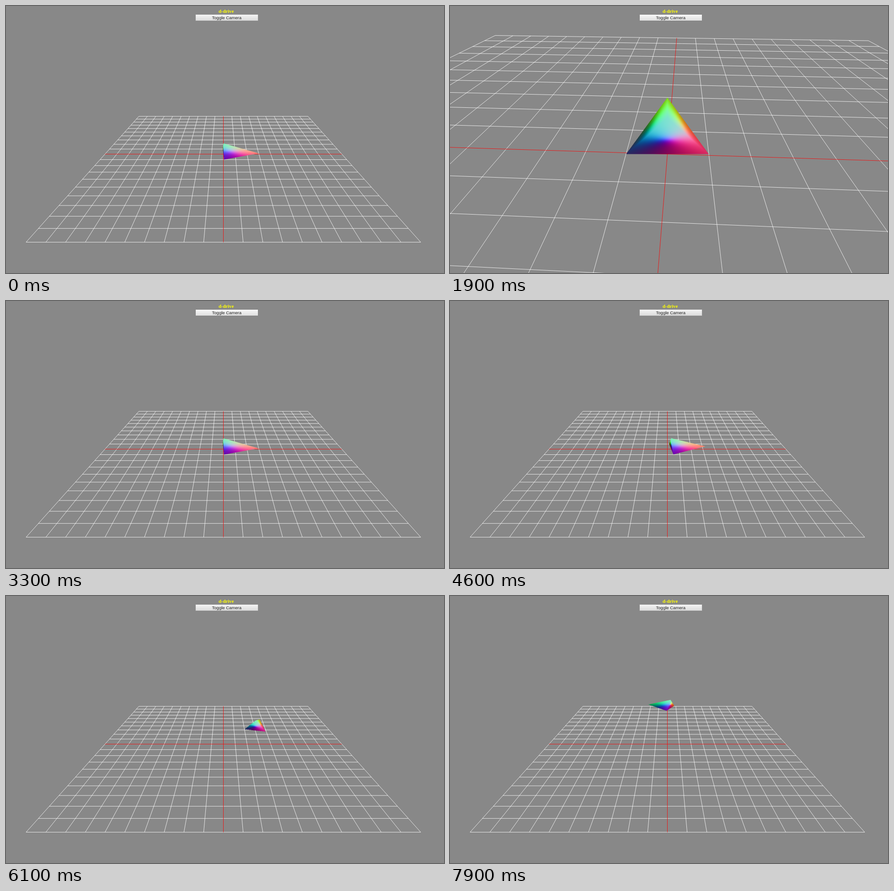
These frames come from a looping animation (958x585 px, 8 s). An HTML page with a canvas:

```html
<!DOCTYPE html>
<html lang="en">
<head>
<meta charset="utf-8">
<title>d-drive</title>
<style>
  html, body { margin: 0; width: 100%; height: 100%; overflow: hidden; background: #888; }
  canvas, svg { position: absolute; left: 0; top: 0; display: block; }
  text { text-anchor: middle; }
  .title { font: bold 10.7px "Liberation Serif", "Times New Roman", serif; fill: #ff0; }
  .label { font: 9.5px "Liberation Sans", Arial, sans-serif; fill: #222; }
</style>
</head>
<body>
<canvas id="view" width="958" height="585"></canvas>
<svg width="958" height="585" viewBox="0 0 958 585">
  <defs>
    <linearGradient id="face" x1="0" y1="0" x2="0" y2="1">
      <stop id="hi" offset="0.1"/>
      <stop id="lo" offset="1"/>
    </linearGradient>
  </defs>
  <text class="title" x="481.5" y="15">d-drive</text>
  <rect id="button" x="414.5" y="18.5" width="137" height="14" fill="url(#face)"/>
  <text class="label" x="482.8" y="28.6">Toggle Camera</text>
</svg>
<script>
const W = 958, H = 585, LOOP = 8000, STEP = 100;
const CX = 475.5, CY = 324.5, FOCAL = 579, NEAR = 0.1;
const GREY = '#888', WHITE = '#fff', RED = '#f00';

const ctx = document.getElementById('view').getContext('2d');

// the vehicle is shaded at double size, then smoothed down
const SS = 2, SW = W * SS, SH = H * SS;
const layer = document.createElement('canvas');
layer.width = SW;
layer.height = SH;
const layerCtx = layer.getContext('2d');
const image = layerCtx.createImageData(SW, SH);
const pixels = new Uint32Array(image.data.buffer);

// vectors
const add = (a, b) => a.map((v, i) => v + b[i]);
const sub = (a, b) => a.map((v, i) => v - b[i]);
const mul = (a, s) => a.map(v => v * s);
const dot = (a, b) => a[0] * b[0] + a[1] * b[1] + a[2] * b[2];
const cross = (a, b) => [
  a[1] * b[2] - a[2] * b[1],
  a[2] * b[0] - a[0] * b[2],
  a[0] * b[1] - a[1] * b[0]
];
const unit = a => mul(a, 1 / Math.hypot(...a));

// vehicle: x forward, y up, z right
const VERTS = [[3, 0, 0], [0, 1, 0], [0, 0, -1], [0, 0, 1]];
const FACES = [[0, 1, 3], [0, 2, 1], [1, 2, 3], [0, 3, 2]];
const NORMALS = smoothNormals();

// area-weighted vertex normals
function smoothNormals() {
  const sums = VERTS.map(() => [0, 0, 0]);
  for (const face of FACES) {
    const [a, b, c] = face.map(i => VERTS[i]);
    const n = cross(sub(b, a), sub(c, a));
    for (const i of face) sums[i] = add(sums[i], n);
  }
  return sums.map(unit);
}

function lookAt(eye, target) {
  const forward = unit(sub(target, eye));
  const right = unit(cross(forward, [0, 1, 0]));
  return { eye, forward, right, up: cross(right, forward) };
}

function toView(cam, p) {
  const d = sub(p, cam.eye);
  return [dot(d, cam.right), dot(d, cam.up), dot(d, cam.forward)];
}

const project = v => [CX + FOCAL * v[0] / v[2], CY - FOCAL * v[1] / v[2], 1 / v[2]];

function drawLine(cam, p, q, color) {
  let a = toView(cam, p), b = toView(cam, q);
  if (a[2] > b[2]) [a, b] = [b, a];
  if (b[2] <= NEAR) return;
  if (a[2] < NEAR) a = add(a, mul(sub(b, a), (NEAR - a[2]) / (b[2] - a[2])));
  const [x0, y0] = project(a), [x1, y1] = project(b);
  ctx.strokeStyle = color;
  ctx.beginPath();
  ctx.moveTo(x0, y0);
  ctx.lineTo(x1, y1);
  ctx.stroke();
}

function drawGrid(cam) {
  const drawPair = (i, color) => {
    drawLine(cam, [i, 0, -10], [i, 0, 10], color);
    drawLine(cam, [-10, 0, i], [10, 0, i], color);
  };
  ctx.lineWidth = 0.8;
  for (let i = 1; i <= 10; i++) {
    drawPair(-i, WHITE);
    drawPair(i, WHITE);
  }
  drawPair(0, RED);
}

const edge = (a, b, x, y) => (b[0] - a[0]) * (y - a[1]) - (b[1] - a[1]) * (x - a[0]);

// each pixel takes its colour from the interpolated view-space normal
function fillFace(pts, normals) {
  const [a, b, c] = pts;
  const area = edge(a, b, c[0], c[1]);
  if (area >= 0) return;
  const xs = pts.map(p => p[0]), ys = pts.map(p => p[1]);
  const x0 = Math.max(0, Math.floor(Math.min(...xs))), x1 = Math.min(SW - 1, Math.ceil(Math.max(...xs)));
  const y0 = Math.max(0, Math.floor(Math.min(...ys))), y1 = Math.min(SH - 1, Math.ceil(Math.max(...ys)));
  const [na, nb, nc] = normals;
  for (let y = y0; y <= y1; y++) {
    for (let x = x0; x <= x1; x++) {
      const px = x + 0.5, py = y + 0.5;
      let u = edge(b, c, px, py) / area;
      let v = edge(c, a, px, py) / area;
      let w = edge(a, b, px, py) / area;
      if (u < 0 || v < 0 || w < 0) continue;
      u *= a[2]; v *= b[2]; w *= c[2];
      const nx = u * na[0] + v * nb[0] + w * nc[0];
      const ny = u * na[1] + v * nb[1] + w * nc[1];
      const nz = u * na[2] + v * nb[2] + w * nc[2];
      const k = 127.5 / (Math.hypot(nx, ny, nz) || 1);
      const red = Math.round(127.5 + nx * k);
      const green = Math.round(127.5 + ny * k);
      const blue = Math.round(127.5 + nz * k);
      pixels[y * SW + x] = (255 << 24 | blue << 16 | green << 8 | red) >>> 0;
    }
  }
}

const heading = yaw => [Math.cos(yaw), 0, -Math.sin(yaw)];

function drawVehicle(cam, pos, yaw) {
  const axes = [heading(yaw), [0, 1, 0], [Math.sin(yaw), 0, Math.cos(yaw)]];
  const toWorld = v => axes.reduce((sum, axis, i) => add(sum, mul(axis, v[i])), [0, 0, 0]);
  const pts = VERTS.map(v => {
    const [x, y, w] = project(toView(cam, add(pos, toWorld(v))));
    return [x * SS, y * SS, w];
  });
  const normals = NORMALS.map(toWorld).map(n =>
    [dot(n, cam.right), dot(n, cam.up), -dot(n, cam.forward)]);
  pixels.fill(0);
  for (const face of FACES) fillFace(face.map(i => pts[i]), face.map(i => normals[i]));
  layerCtx.putImageData(image, 0, 0);
  ctx.drawImage(layer, 0, 0, W, H);
}

// speeds up to a limit, then holds a steady left turn
const yawAt = n => 0.05 + 0.0755 * Math.max(0, n - 4.4);

function drive(steps) {
  let pos = [0, 0, 0];
  for (let i = 1; i <= steps; i++) {
    const speed = Math.min(0.418, 0.021 * (i - 1));
    pos = add(pos, mul(heading(yawAt(i - 0.85)), speed));
  }
  return { pos, yaw: yawAt(steps) };
}

const LOOKS = {
  normal: ['#f2f2f2', '#dadada', '#929292'],
  hover: ['#f6f6f6', '#dedede', '#868686'],
  pressed: ['#e4e4e4', '#d4d4d4', '#868686']
};
const within = (t, from, to) => t >= from && t < to;

function buttonLook(t) {
  if (within(t, 1800, 1900) || within(t, 3200, 3300)) return LOOKS.pressed;
  if (within(t, 1200, 2100) || within(t, 3000, 3700)) return LOOKS.hover;
  return LOOKS.normal;
}

function drawButton(t) {
  const [hi, lo, border] = buttonLook(t);
  document.getElementById('hi').setAttribute('stop-color', hi);
  document.getElementById('lo').setAttribute('stop-color', lo);
  document.getElementById('button').setAttribute('stroke', border);
}

function render(t) {
  const { pos, yaw } = drive(Math.max(0, (t - 4000) / STEP));
  const cam = within(t, 1900, 3300)
    ? lookAt(add(add(pos, mul(heading(yaw), -5)), [0, 4, 0]), pos)
    : lookAt([0, 10, 20], [0, 0, 0]);
  ctx.fillStyle = GREY;
  ctx.fillRect(0, 0, W, H);
  drawGrid(cam);
  drawVehicle(cam, pos, yaw);
  drawButton(t);
}

const start = performance.now();
let shown = -1;

function tick() {
  const t = (performance.now() - start) % LOOP;
  const now = Math.floor(t / STEP) * STEP;
  if (now !== shown) render(shown = now);
  requestAnimationFrame(tick);
}
tick();
</script>
</body>
</html>
```
